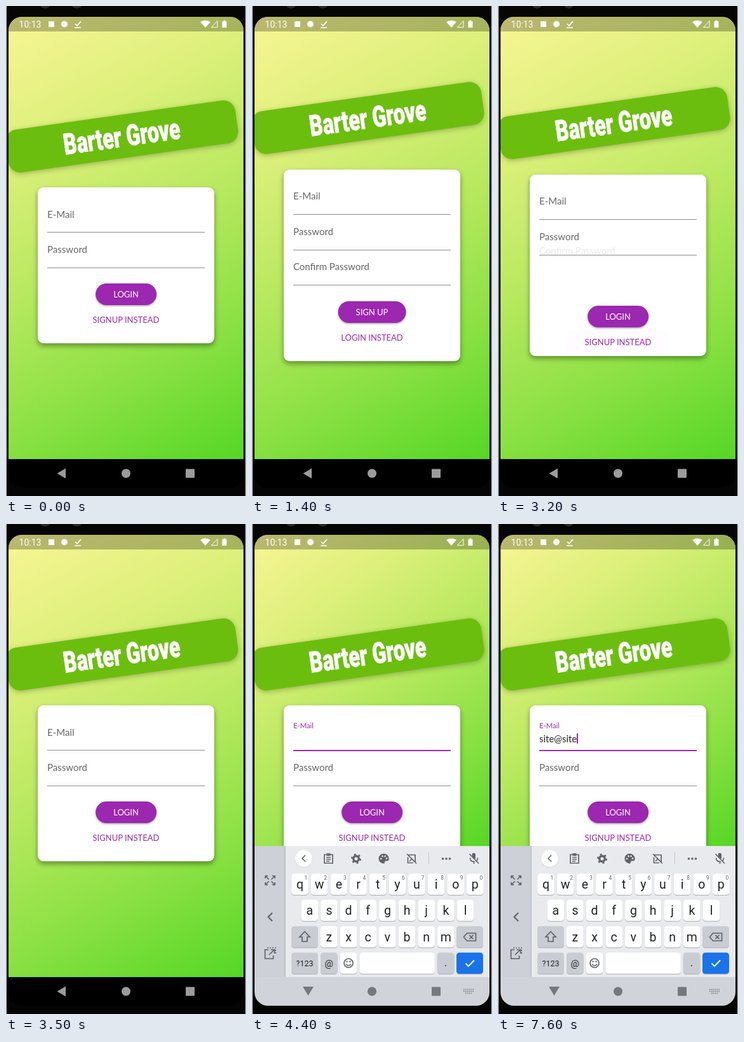
An HTML page that plays this animation: 378x770 px, repeating every 8 s.

```html
<!DOCTYPE html>
<html lang="en">
<head>
<meta charset="utf-8">
<title>Sign-in form</title>
<style>
  html, body { margin: 0; width: 100%; height: 100%; overflow: hidden; background: #050505; }
  #stage { position: relative; width: 378px; height: 770px; overflow: hidden; font: 15px/20px Lato, sans-serif; }
  #stage div, svg { position: absolute; }
  #bezel { inset: 0; border: solid; border-width: 0 1px; border-color: #3a3a3a #c8c8c8; box-sizing: border-box; }
  .lens { top: -13px; width: 17px; height: 17px; border-radius: 50%; background: #2a2a2a; }
  #screen { inset: 0; background: #000; clip-path: inset(17px 4px 13px 4px round 21px); }
  #body { left: 4px; top: 17px; width: 370px; overflow: hidden; }
  #form { left: -4px; top: -17px; width: 378px; height: 770px; }
  #banner {
    left: 0; width: 365px; height: 68px; border-radius: 18.5px;
    background: #6bbe0e; box-shadow: 0 2px 8px rgba(0,0,0,.26);
    transform: rotate(-8deg); text-align: center;
  }
  #banner span {
    display: inline-block; white-space: nowrap; margin: 0 -40px; color: #fff;
    font: 900 46px/68px Roboto, sans-serif; transform: scaleX(.7);
    -webkit-text-stroke: .8px #fff;
  }
  #card { left: 50px; width: 278px; border-radius: 9px; background: #fff; overflow: hidden; }
  #shade { left: 50px; width: 278px; border-radius: 9px; box-shadow: 0 4px 7px 1px rgba(0,0,0,.32); }
  .label { left: 15px; margin-top: -.8px; color: #666; white-space: nowrap; transform-origin: 0 50%; }
  .line { left: 15px; width: 248px; height: 1px; background: #8c8c8c; }
  #confirm { left: 0; top: 126px; width: 278px; height: 56px; }
  #confirm.disabled .label { color: #9e9e9e; }
  #confirm.disabled .line { background: none; }
  #entry { left: 15px; top: 42px; display: flex; align-items: center; color: #222; }
  #caret { width: 2px; height: 16px; background: #9c27b0; }
  #button, #swap { left: 50%; transform: translate(-50%, -50%); font-size: 13px; line-height: 34px; white-space: nowrap; }
  #button {
    padding: 0 28px; border-radius: 17px; color: #fff; background: #9c27b0;
    box-shadow: 0 1.5px 3px rgba(0,0,0,.35);
  }
  #swap { padding: 0 28px; border-radius: 4px; color: #9c27b0; }
  text { font-family: Roboto, sans-serif; fill: #202124; text-anchor: middle; }
  .letter { font-size: 19.5px; }
  .hint { font-size: 8.5px; fill: #5f6368; }
  .ink { fill: none; stroke: #5f6368; stroke-width: 1.7; }
  .solid { fill: #5f6368; }
</style>
</head>
<body>
<div id="stage">
  <div id="bezel"></div>
  <div class="lens" style="left:53px"></div>
  <div class="lens" style="left:103px"></div>
  <div id="screen">
    <div id="body">
      <div id="form">
        <div id="banner"><span>Barter Grove</span></div>
        <div id="shade"></div>
        <div id="card">
          <div class="label" id="mail" style="top:32.5px">E-Mail</div>
          <div id="entry"><span id="value"></span><span id="caret"></span></div>
          <div class="line" id="mailLine"></div>
          <div class="label" style="top:88px">Password</div>
          <div class="line" style="top:126px"></div>
          <div id="confirm">
            <div class="label" style="top:17.5px">Confirm Password</div>
            <div class="line" style="top:55px"></div>
          </div>
          <div id="button"></div>
          <div id="swap"></div>
        </div>
      </div>
    </div>
    <svg width="378" height="770" viewBox="0 0 378 770">
      <rect x="4" y="17" width="370" height="23" opacity=".25"/>
      <g fill="#fff">
        <text x="38" y="33.5" font-size="14" style="fill:#fff">10:13</text>
        <rect x="67" y="24" width="9" height="9"/>
        <circle cx="92" cy="28.5" r="5"/>
        <path d="M109 28l3 3 6-7M108 34h10" fill="none" stroke="#fff" stroke-width="1.7"/>
        <path d="M306 25q8-5 16 0l-8 9z"/>
        <path d="M323.500 33.500h9.500v-10z" fill="none" stroke="#fff"/>
        <path d="M340.500 24h2v-1.500h3v1.500h2v10h-7z"/>
      </g>
      <g id="keyboard">
        <rect x="4" y="506" width="370" height="206" fill="#e8eaee"/>
        <rect x="4" y="506" width="48" height="206" fill="#cdd0d6"/>
        <rect x="51" y="506" width="2" height="206" fill="#bfc2c8"/>
        <g class="ink">
          <path d="M21 557v-4h4M32 553h4v4M36 563v4h-4M25 567h-4v-4M21.500 553.500l5 5M35.500 553.500l-5 5M35.500 566.500l-5-5M21.500 566.500l5-5"/>
          <path d="M32 611l-6.500 6.500 6.500 6.500" stroke-width="2.2"/>
          <path d="M26 669h-5.500v14h13v-5M27 677l8-8M29.500 669h6v6"/>
          <path d="M24 666h13v11" stroke-dasharray="2 2"/>
        </g>
        <circle cx="81.500" cy="526" r="14" fill="#d4d6da"/>
        <circle cx="81.500" cy="525.500" r="13.500" fill="#fff"/>
        <path id="chevron" class="ink" d="M2.500-5l-5 5 5 5"/>
        <g id="tools">
          <g class="ink">
            <path d="M114 519.500h13v13.500h-13zM117 524h7M117 527h7M117 530h5"/>
            <circle cx="164" cy="526" r="4.300" stroke-width="3.400"/>
            <circle cx="164" cy="526" r="6.800" stroke-width="2.400" stroke-dasharray="3 4.120"/>
            <path d="M245 520h12v12M254 532.500h-8.500v-9M244 518.500l15 15M248 530l4-4"/>
            <path d="M278.500 516v19" stroke="#c3c6cb" stroke-width="1"/>
          </g>
          <rect class="solid" x="117.500" y="517.500" width="6" height="4"/>
          <path class="solid" d="M207.500 518a8 7.700 0 1 0 0 15.500c3 0 0-4 3-4h2.500c5 0 3-11.500-5.500-11.500z"/>
          <g fill="#e8eaee">
            <circle cx="203" cy="526" r="1.300"/><circle cx="205.500" cy="522" r="1.300"/>
            <circle cx="209.500" cy="522" r="1.300"/><circle cx="212" cy="525.500" r="1.300"/>
          </g>
          <g class="solid">
            <circle cx="300.500" cy="526" r="1.800"/><circle cx="306" cy="526" r="1.800"/><circle cx="311.500" cy="526" r="1.800"/>
          </g>
        </g>
        <text id="hintWord" x="212" y="531.500" font-size="16" style="fill:#3c4043"></text>
        <rect class="solid" x="346.500" y="517" width="5.500" height="10" rx="2.700"/>
        <path class="ink" d="M343.500 524.500q0 6 6 6t6-6M349.500 530v4"/>
        <path d="M341.500 519.500l15 14" stroke="#e8eaee" stroke-width="3"/>
        <path class="ink" d="M342.500 518.500l14.500 15"/>
        <g id="keys"></g>
        <path id="shift" class="ink" d="M83 640.500l8 8.500h-4v7h-8v-7h-4z"/>
        <path class="ink" d="M338.500 643h14v12h-14l-5-6zM342.500 646l6 6M348.500 646l-6 6"/>
        <circle class="ink" cx="152" cy="690" r="7"/>
        <path class="ink" d="M148 691.500q4 5 8 0"/>
        <circle class="solid" cx="149.500" cy="687.500" r="1.200"/><circle class="solid" cx="154.500" cy="687.500" r="1.200"/>
        <path d="M336.500 690.500l4.500 4.500 9-9.500" fill="none" stroke="#fff" stroke-width="1.900"/>
      </g>
      <rect id="nav" x="4" y="712" width="370" height="45"/>
      <g id="navIcons">
        <path id="back"/>
        <circle cx="189" cy="734.500" r="7"/>
        <rect x="283" y="727.500" width="14" height="14" rx="1"/>
      </g>
      <path id="switcher" d="M333 731.500h16M333 734.500h16M336 737.500h10" stroke="#75787d" stroke-width="1.600" stroke-dasharray="1.700 1.200"/>
    </svg>
  </div>
</div>
<script>
const LOOP = 8000;
const $ = id => document.getElementById(id);
const clamp = v => Math.max(0, Math.min(1, v));
const span = (t, from, length) => clamp((t - from) / length);
const within = (t, from, to) => t >= from && t < to;
const show = (id, on) => { $(id).style.visibility = on ? 'visible' : 'hidden'; };

function bezier(x1, y1, x2, y2) {
  const at = (a, b, s) => 3 * a * s * (1 - s) ** 2 + 3 * b * s * s * (1 - s) + s ** 3;
  return x => {
    let lo = 0, hi = 1;
    for (let i = 0; i < 24; i++) {
      const mid = (lo + hi) / 2;
      if (at(x1, x2, mid) < x) lo = mid; else hi = mid;
    }
    return at(y1, y2, lo);
  };
}
const easeIn = bezier(.42, 0, 1, 1);
const easeOut = bezier(0, 0, .2, 1);
const standard = bezier(.4, 0, .2, 1);

// Colour and alpha are mixed separately, then laid over an off-white page
const YELLOW = [246, 240, 46, .5], GREEN = [67, 211, 14, .9];
const stops = [0, .25, .5, .75, 1].map(k =>
  `rgba(${YELLOW.map((v, i) => v + (GREEN[i] - v) * k)}) ${k * 100}%`);

// Keyboard keys
const PITCH = 30.65;
const GREY = '#c9ccd2';
const key = (x, y, w, fill = '#fff') =>
  `<rect x="${x}" y="${y + 1}" width="${w}" height="33.500" rx="4.500" fill="#b4b7bc"/>` +
  `<rect x="${x}" y="${y}" width="${w}" height="33.300" rx="4.500" fill="${fill}"/>`;
const word = (x, y, s, cls = '', size = '') =>
  `<text x="${x}" y="${y}" class="${cls}" font-size="${size}">${s}</text>`;

let keys = '';
[['qwertyuiop', 75.5, 549.5], ['asdfghjkl', 90.8, 590.5], ['zxcvbnm', 121.4, 632]].forEach(([row, x0, y], r) => {
  [...row].forEach((c, i) => {
    const x = x0 + i * PITCH;
    keys += key(x - 13.3, y, 26.6) + word(x, y + 23.5, c, 'letter');
    if (r === 0) keys += word(x + 9.5, y + 9, (i + 1) % 10, 'hint');
  });
});
keys += key(62, 632, 42, GREY) + key(322, 632, 42, GREY) +
  key(62, 673.5, 42, GREY) + word(83, 695, '?123', '', 12.5) +
  key(108, 673.5, 26.6, GREY) + word(121.3, 696, '@', '', 15) +
  key(138.7, 673.5, 26.6) + key(169.3, 673.5, 118.5) +
  key(291.8, 673.5, 26.6, GREY) + word(305, 695, '.', '', 17) +
  key(322, 673.5, 42, '#1a73e8');
$('keys').innerHTML = keys;
const letters = document.querySelectorAll('.letter');

const OPEN = 1055, CLOSE = 3060, FOCUS = 4000, SLIDE = 300;
const LEAD = 40; // the fading field starts before the card resizes
const GROWTH = 56.5, FIELD = 55.5;
const typed = [
  [5300, 's'], [5600, 'si'], [5700, 'sit'], [5800, 'site'], [6300, 'site@'],
  [7100, 'site@s'], [7300, 'site@si'], [7500, 'site@sit'], [7600, 'site@site']
];

function drawForm(t) {
  const closing = t >= CLOSE - LEAD;
  const from = closing ? CLOSE : OPEN;
  const run = easeIn(span(t, from, SLIDE));
  const lead = span(t, from - LEAD, SLIDE);
  const grown = closing ? 1 - run : run;
  const reveal = closing ? 1 - lead : lead;
  const signup = within(t, OPEN - LEAD, CLOSE - LEAD);
  const height = 245 + GROWTH * grown;
  const top = 407.5 - height / 2;
  const extra = Math.min(Math.max(FIELD, GROWTH * grown), 2 * GROWTH * grown);

  for (const id of ['card', 'shade']) {
    $(id).style.top = top + 'px';
    $(id).style.height = height + 'px';
  }
  $('banner').style.top = top - 114.5 + 'px';
  $('confirm').className = signup ? '' : 'disabled';
  $('confirm').style.opacity = easeIn(reveal);
  $('confirm').style.transform = `translateY(${-1.5 * FIELD * (1 - standard(reveal))}px)`;
  $('button').textContent = signup ? 'SIGN UP' : 'LOGIN';
  $('button').style.top = 168 + extra + 'px';
  $('swap').textContent = signup ? 'LOGIN INSTEAD' : 'SIGNUP INSTEAD';
  $('swap').style.top = 208 + extra + 'px';
  const press = within(t, 1000, 1300) ? 1 - span(t, 1050, 250)
    : within(t, 2900, 3300) ? 1 - span(t, 3000, 250) : 0;
  $('swap').style.background = `rgba(156,39,176,${.06 * press})`;
}

function drawEntry(t) {
  const focused = t >= FOCUS;
  const lift = standard(span(t, FOCUS, 200));
  $('mail').style.transform = `translateY(${-10.5 * lift}px) scale(${1 - .25 * lift})`;
  $('mail').style.color = focused ? '#9c27b0' : '#666';
  $('mailLine').style.cssText = focused
    ? 'top:69.500px;height:2px;background:#9c27b0' : 'top:70px';

  const text = typed.reduce((last, [at, s]) => t >= at ? s : last, '');
  $('value').textContent = text;
  $('value').style.textDecoration = t < 6300 ? 'underline' : 'none';
  const blink = within(t, 4400, 4900) || within(t, 6200, 6300) || within(t, 6700, 7100);
  show('caret', focused && !blink);
  return text;
}

function drawKeyboard(t, text) {
  const up = t >= 4100;
  const slide = easeOut(span(t, 4080, 300));
  $('keyboard').setAttribute('transform', `translate(0 ${206 * (1 - slide)})`);
  show('keyboard', up);

  const suggesting = within(t, 5400, 6400);
  show('tools', up && !suggesting);
  $('hintWord').textContent = suggesting ? text : '';
  $('chevron').setAttribute('transform', `translate(81.5 525.5) scale(${suggesting ? -1 : 1} 1)`);

  const caps = within(t, 6200, 6300);
  letters.forEach(el => {
    el.textContent = caps ? el.textContent.toUpperCase() : el.textContent.toLowerCase();
  });
  $('shift').style.fill = caps ? '#3c4043' : 'none';

  $('nav').setAttribute('fill', up ? '#d0d3d9' : '#000');
  $('navIcons').setAttribute('fill', up ? '#75787d' : '#9c9c9c');
  $('back').setAttribute('d', up ? 'M80 727h17l-8.500 14z' : 'M94 726.500v16l-13.500-8z');
  show('switcher', up);

  const height = t >= 4200 ? 489 : 695;
  const angle = 180 - Math.atan(370 / height) * 180 / Math.PI;
  $('body').style.height = height + 'px';
  $('body').style.background = `linear-gradient(${angle}deg, ${stops}) #fafafa`;
}

function draw(now) {
  const t = now % LOOP;
  drawForm(t);
  drawKeyboard(t, drawEntry(t));
}

const start = performance.now();
function tick() {
  draw(performance.now() - start);
  requestAnimationFrame(tick);
}
tick();
</script>
</body>
</html>
```
